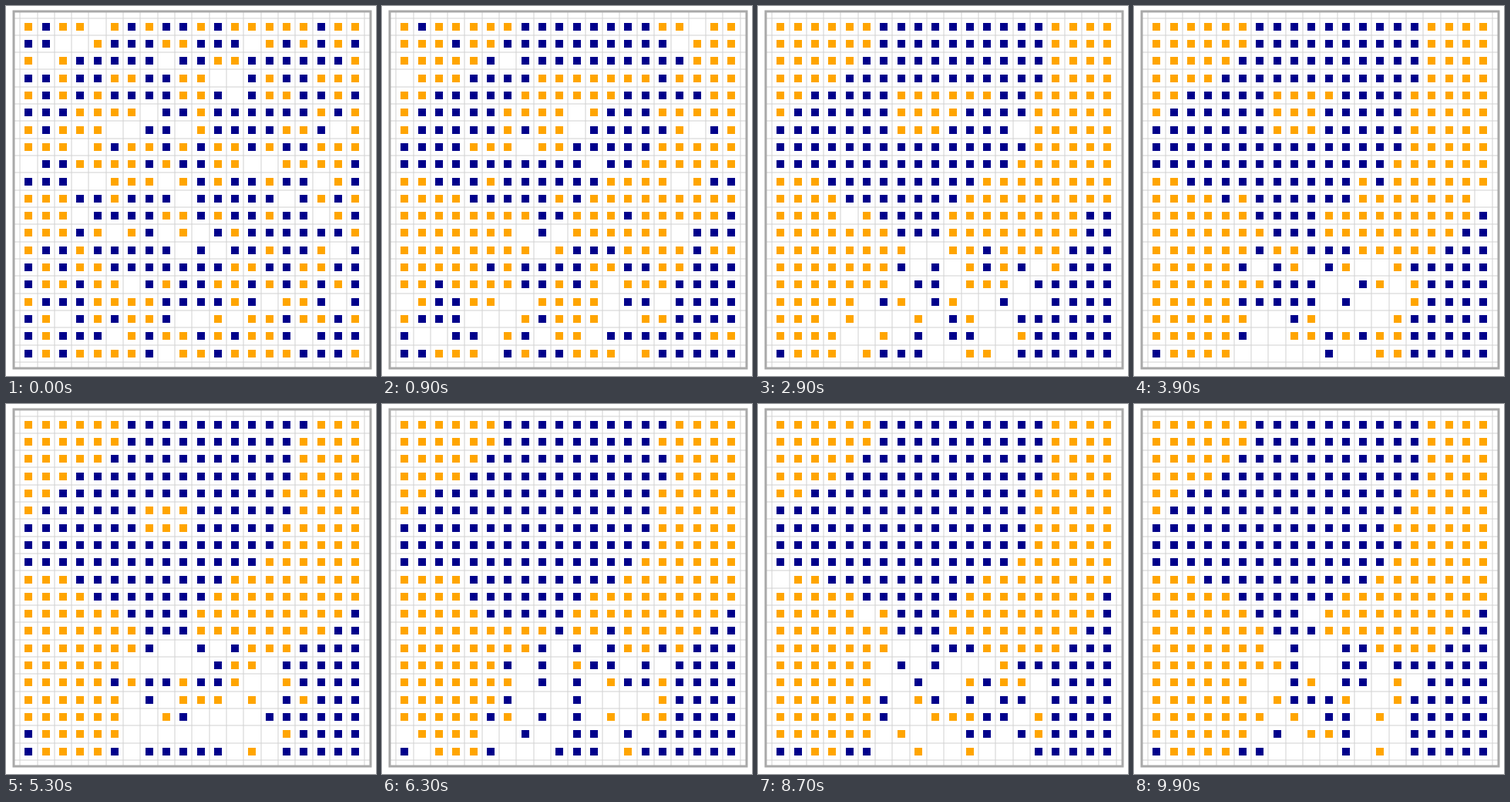
Animation, 480 px wide and 480 px high, one loop 10000 ms. Source, as a matplotlib script:

```python
import numpy as np
import matplotlib.pyplot as plt
from matplotlib.animation import FuncAnimation
from matplotlib.collections import LineCollection, PolyCollection
from matplotlib.patches import Rectangle

SIZE, DPI, N = 480, 100, 20
STEPS, FRAMES, INTERVAL = 50, 100, 100
PX = 72 / DPI
PITCH = 424 / 19
X0, Y0 = 29.35, 26.68
EMPTY, ORANGE, BLUE = 0, 1, 2
COLORS = np.array([(1, 1, 1, 0), (1, 165 / 255, 0, 1), (0, 0, 139 / 255, 1)])

row, col = np.mgrid[:N, :N]
rng = np.random.default_rng(12)


def edge(*points):
    """Column of a border for every row, through (row, column) points."""
    return np.round(np.interp(row, *zip(*points)))


core_left = edge((1, 6), (4, 2.4), (6, 0), (8, 0), (9, 3), (12, 7), (19, 5))
core_right = edge((0, 16), (7, 15), (11, 10), (12, 10), (14, 16), (19, 16))
corner_left = edge((10, 20), (14, 16), (19, 15))


def settled(k):
    """Neighbourhood layout at step k; EMPTY marks the restless zone."""
    # The orange block at the lower left fills in late.
    left = np.where(row > 15, np.minimum(core_left, 1 + 0.5 * max(k - 10, 0)),
                    core_left)
    core = (col >= left) & (col < core_right)
    zone = np.where(core, np.where(row < 13, BLUE, EMPTY), ORANGE)
    zone[col >= corner_left] = BLUE
    zone[-1, 0] = BLUE
    # An orange pocket shrinks inside the blue mass.
    if k < 30:
        tilt = np.clip((25 - k) / 15, 0, 1)
        mid = 8 - tilt * (row - 5.3)
        dist = np.maximum(abs(col - mid), 1.3 * abs(row - 5.3))
        zone[dist < 3.5 - 0.09 * k] = ORANGE
    return zone


def border_cells(zone):
    p = np.pad(zone, 1, mode="edge")
    return ((p[:-2, 1:-1] != zone) | (p[2:, 1:-1] != zone)
            | (p[1:-1, :-2] != zone) | (p[1:-1, 2:] != zone))


def residents(vacancy):
    cells = rng.choice([ORANGE, BLUE], (N, N), p=[0.47, 0.53])
    cells[rng.random((N, N)) < vacancy] = EMPTY
    return cells


def simulate():
    noise = residents(0.09)
    settle = 1 + np.minimum(rng.exponential(2.4, (N, N)), 8)
    luck = rng.random((N, N))
    states = [noise]
    for k in range(1, STEPS + 1):
        zone = settled(k)
        vacancy = np.where(zone == EMPTY, 0.09 + 0.36 * min(k / 10, 1), 0.15)
        noise = np.where(rng.random((N, N)) < 0.5, residents(vacancy), noise)
        luck = np.where(rng.random((N, N)) < 0.4, rng.random((N, N)), luck)
        restless = border_cells(zone) & (luck < 0.02 + 0.015 * row)
        restless |= (zone == EMPTY) | (k < settle)
        states.append(np.where(restless, noise, zone))
    return states


states = simulate()

fig = plt.figure(figsize=(SIZE / DPI, SIZE / DPI), dpi=DPI, facecolor="white")
ax = fig.add_axes([0, 0, 1, 1])
ax.set_xlim(0, SIZE)
ax.set_ylim(SIZE, 0)
ax.axis("off")

left, top, side = 10, 7, 463
ticks = np.arange(N + 1) - 0.5
grid = [[(x, top), (x, top + side)] for x in np.round(X0 + PITCH * ticks)]
grid += [[(left, y), (left + side, y)] for y in np.round(Y0 + PITCH * ticks)]
ax.add_collection(LineCollection(grid, colors="lightgray", linewidths=PX,
                                 snap=False))
ax.add_patch(Rectangle((left, top), side, side, fill=False, ec="darkgray",
                       lw=3 * PX, joinstyle="miter", snap=False, zorder=3))

centres = np.stack([np.round(X0 + PITCH * col).ravel(),
                    np.round(Y0 + PITCH * row).ravel()], axis=1)
corners = np.array([(-5, -5), (5, -5), (5, 5), (-5, 5)])
squares = PolyCollection(centres[:, None] + corners, linewidths=0, zorder=2)
ax.add_collection(squares)


def draw(i):
    squares.set_facecolor(COLORS[states[(i + 1) // 2].ravel()])
    return (squares,)


anim = FuncAnimation(fig, draw, frames=FRAMES, interval=INTERVAL,
                     repeat=True, repeat_delay=0, blit=False)
plt.show()
```
